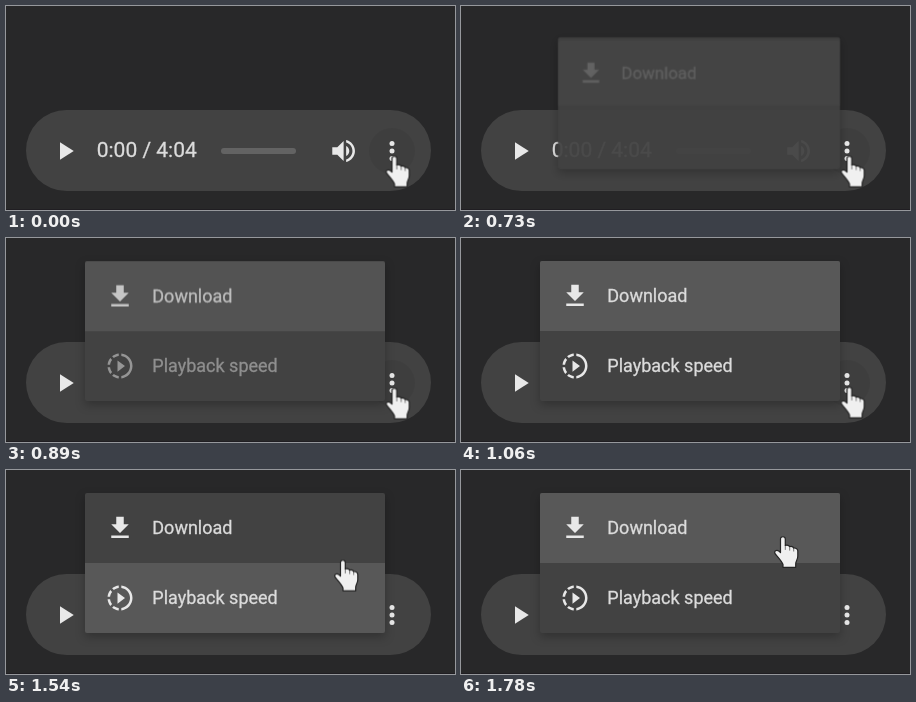
An HTML page for the animation above (2.73 s loop, 449 by 204 pixels).

```html
<!DOCTYPE html>
<html lang="en">
<head>
<meta charset="utf-8">
<title>Audio player menu</title>
<style>
  html, body { margin: 0; width: 100%; height: 100%; overflow: hidden; background: #282829; }
  svg { display: block; width: 449px; height: 204px; font-family: Roboto, sans-serif; }
  .icon { fill: #e8e8e8; }
  text { fill: #dcdcdc; stroke: #dcdcdc; stroke-width: .3px; }
  .label { font-size: 18px; }
  .time { font-size: 21px; }
  .hover { fill: #585858; }
  .sheet { fill: #424242; filter: drop-shadow(0 4px 5px rgba(0, 0, 0, .25)); }

  .menu, .first, .second, .hover, .press, .cursor {
    animation: 2730ms step-end infinite;
  }
  .menu { animation-name: open; transform-origin: 379px 163px; }
  .first { animation-name: first; }
  .second { animation-name: second; }
  .first .hover { animation-name: hover-first; }
  .second .hover { animation-name: hover-second; }
  .press { animation-name: press; }
  .cursor { animation-name: move; }

  @keyframes open {
    0% { opacity: 0; transform: scale(.557); }
    23.077% { opacity: .6; transform: scale(.557); }
    26.74% { opacity: .95; transform: scale(.94); }
    28.938% { opacity: 1; transform: scale(.9945); }
    31.502%, 100% { opacity: 1; transform: none; }
  }
  @keyframes first {
    0% { opacity: 0; transform: translateY(4px); }
    26.74% { opacity: .22; transform: translateY(3px); }
    28.938% { opacity: .6; transform: translateY(1.3px); }
    31.502% { opacity: .8; transform: translateY(.5px); animation-timing-function: steps(5); }
    38.828%, 100% { opacity: 1; transform: none; }
  }
  @keyframes second {
    0% { opacity: 0; }
    28.938% { opacity: .27; }
    31.502% { opacity: .5; animation-timing-function: steps(5); }
    38.828%, 100% { opacity: 1; }
  }
  @keyframes hover-first {
    0%, 58.974%, 100% { opacity: 1; }
    47.619% { opacity: 0; }
  }
  @keyframes hover-second {
    0%, 58.974%, 100% { opacity: 0; }
    47.619% { opacity: 1; }
  }
  @keyframes press {
    0% { opacity: 1; }
    47.619%, 100% { opacity: 0; }
  }
  @keyframes move {
    0% { transform: translate(379.5px, 149.5px); }
    38.828% { transform: translate(379.5px, 148.5px); }
    47.619% { transform: translate(361.5px, 123px); }
    50.183% { transform: translate(351px, 111px); }
    53.846% { transform: translate(337px, 98px); }
    56.41% { transform: translate(328px, 89.5px); }
    58.974% { transform: translate(321px, 79px); }
    62.637% { transform: translate(315px, 70px); }
    65.201%, 100% { transform: translate(313px, 66px); }
  }
</style>
</head>
<body>
<svg viewBox="0 0 449 204">
  <rect width="449" height="204" fill="#282829"/>
  <rect y="203" width="449" height="1" fill="#201e22"/>

  <rect x="20" y="104" width="405" height="81" rx="40.5" fill="#424242"/>
  <circle class="press" cx="386" cy="145" r="23" fill="#000" fill-opacity=".05"/>
  <path class="icon" transform="translate(44 130) scale(1.25)" d="M8 5v14l11-7z"/>
  <text class="time" x="90.7" y="151">0:00 / 4:04</text>
  <rect x="215" y="142" width="75" height="6" rx="3" fill="#636363"/>
  <path class="icon" transform="translate(322.5 130) scale(1.26 1.25)"
    d="M3 9v6h4l5 5V4L7 9H3zm13.5 3c0-1.77-1.02-3.29-2.5-4.03v8.05c1.48-.73 2.5-2.25 2.5-4.02zM14 3.23v2.06c2.89.86 5 3.54 5 6.71s-2.11 5.85-5 6.71v2.06c4.01-.91 7-4.49 7-8.77s-2.99-7.86-7-8.77z"/>
  <g class="icon">
    <circle cx="386" cy="137.5" r="2.5"/>
    <circle cx="386" cy="145" r="2.5"/>
    <circle cx="386" cy="152.5" r="2.5"/>
  </g>

  <g class="menu">
    <rect class="sheet" x="79" y="23" width="300" height="140" rx="2"/>
    <g class="first">
      <path class="hover" d="M79 93V25a2 2 0 0 1 2-2H377a2 2 0 0 1 2 2V93z"/>
      <path class="icon" transform="translate(99 43) scale(1.25)" d="M19 9h-4V3H9v6H5l7 7 7-7zM5 18v2h14v-2H5z"/>
      <text class="label" x="146.3" y="64">Download</text>
    </g>
    <g class="second">
      <path class="hover" d="M79 93V161a2 2 0 0 0 2 2H377a2 2 0 0 0 2-2V93z"/>
      <path class="icon" transform="translate(99 113) scale(1.25)"
        d="M10 7.5v9l6-4.5zM11 4.07V2.05c-2.01.2-3.84 1-5.32 2.21L7.1 5.69c1.11-.86 2.44-1.44 3.9-1.62zM5.69 7.1L4.26 5.68C3.05 7.16 2.25 8.99 2.05 11h2.02c.18-1.46.76-2.79 1.62-3.9zM4.07 13H2.05c.2 2.01 1 3.84 2.21 5.32l1.43-1.43c-.86-1.1-1.44-2.43-1.62-3.89zm1.61 6.74C7.16 20.95 9 21.75 11 21.95v-2.02c-1.46-.18-2.79-.76-3.9-1.62l-1.42 1.43zM22 12c0 5.16-3.92 9.42-8.95 9.95v-2.02C16.97 19.41 20 16.05 20 12s-3.03-7.41-6.95-7.93V2.05C18.08 2.58 22 6.84 22 12z"/>
      <text class="label" x="146.3" y="134">Playback speed</text>
    </g>
  </g>

  <g class="cursor" stroke="#242424" stroke-linejoin="round" stroke-linecap="round">
    <path fill="#f0f0f0" stroke-width="1.2"
      d="M6.5 3C6.5 0 11.3 0 11.3 3V9.5C13 8.8 15.3 9.3 15.7 10.7C17.3 10.1 19.3 10.7 19.7 12.1C22 11.7 23.8 13 23.8 15V20C23.8 24 21.7 25 21.7 28V31.3H9V28.5C8 25.5 4.3 21.5 1.3 18C-.5 15.2 2.5 13.3 4.8 15L6.5 16.5Z"/>
    <path fill="none" stroke-width=".6" d="M11.3 9.500v4M15.700 10.700v3.500M19.700 12.100v3"/>
  </g>
</svg>
</body>
</html>
```
